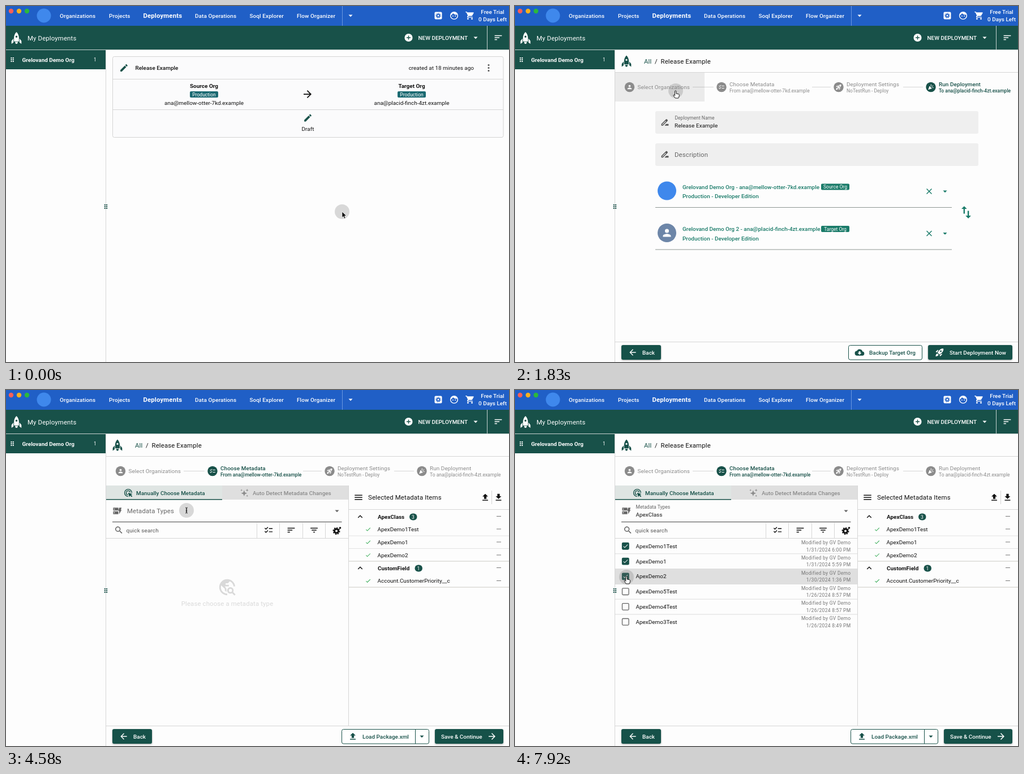
Animation, 889 px wide and 630 px high, one loop 8000 ms. Source, as an HTML page:

```html
<!DOCTYPE html>
<html lang="en">
<head>
<meta charset="utf-8">
<title>Deployments</title>
<style>
html, body { margin: 0; width: 100%; height: 100%; overflow: hidden; background: #fdfdfd; }
svg { display: block; width: 100vw; height: 100vh; font-family: Roboto, sans-serif; }
text { white-space: pre; }
</style>
</head>
<body>
<svg id="stage" viewBox="0 0 889 630" xmlns="http://www.w3.org/2000/svg"></svg>
<script>
const GREEN = '#185149', TEAL = '#1a7b69', BLUE = '#205fc6', LOGO = '#3f88ec', INK = '#111', GREY = '#8b8b8b', PAGE = '#fdfdfd';
const S = 8.53, M = 9.95, L = 11.38;
const ORG = 'Grelovand Demo Org', JOB = 'Release Example';
const FROM = 'ana@mellow-otter-7kd.example', TO = 'ana@placid-finch-4zt.example';

const ICON = {
  edit: 'M3 17.25V21h3.75L17.81 9.94l-3.75-3.75zM20.71 7.04c.39-.39.39-1.02 0-1.41l-2.34-2.34c-.39-.39-1.02-.39-1.41 0l-1.83 1.83 3.75 3.75z',
  rename: 'M18.41 5.8L17.2 4.59c-.78-.78-2.05-.78-2.83 0L3 15.96V20h4.04L18.41 8.63c.79-.78.79-2.05 0-2.83zM6.21 18H5v-1.21l8.66-8.66 1.21 1.21zM11 20l4-4h6v4z',
  next: 'M12 4l-1.41 1.41L16.17 11H4v2h12.17l-5.58 5.59L12 20l8-8z',
  back: 'M20 11H7.83l5.59-5.59L12 4l-8 8 8 8 1.41-1.41L7.83 13H20z',
  drop: 'M7 10l5 5 5-5z',
  add: 'M12 2a10 10 0 1 0 0 20 10 10 0 1 0 0-20zm5 11h-4v4h-2v-4H7v-2h4V7h2v4h4z',
  sort: 'M3 18h6v-2H3zM3 6v2h18V6zM3 13h12v-2H3z',
  filter: 'M10 18h4v-2h-4zM3 6v2h18V6zM6 13h12v-2H6z',
  menu: 'M3 18h18v-2H3zM3 13h18v-2H3zM3 6v2h18V6z',
  cart: 'M7 18a2 2 0 1 0 0 4 2 2 0 1 0 0-4zM17 18a2 2 0 1 0 0 4 2 2 0 1 0 0-4zM1 2v2h2l3.6 7.6-1.4 2.4c-.7 1.4.3 3 1.8 3h12v-2H7.4l1.1-2h7.4c.8 0 1.4-.4 1.8-1l3.6-6.5c.3-.7-.2-1.5-.9-1.5H5.2l-.9-2z',
  face: 'M12 2a10 10 0 1 0 0 20 10 10 0 1 0 0-20zm0 18a8 8 0 0 1-8-9c2.4-.9 4.2-2.7 5.2-5 2 2.8 5 4.2 10.5 4A8 8 0 0 1 12 20zM9 11.7a1.3 1.3 0 1 0 0 2.6 1.3 1.3 0 1 0 0-2.6zm6 0a1.3 1.3 0 1 0 0 2.6 1.3 1.3 0 1 0 0-2.6z',
  person: 'M12 12a4 4 0 1 0 0-8 4 4 0 1 0 0 8zm0 2c-2.67 0-8 1.34-8 4v2h16v-2c0-2.66-5.33-4-8-4z',
  list: 'M22 7h-9v2h9zM22 15h-9v2h9zM5.54 11L2 7.46l1.41-1.41 2.12 2.12 4.24-4.24 1.41 1.41zM5.54 19L2 15.46l1.41-1.41 2.12 2.12 4.24-4.24 1.41 1.41z',
  search: 'M15.5 14h-.8l-.3-.3a6.5 6.5 0 1 0-.7.7l.3.3v.8l5 5 1.5-1.5zm-6 0a4.5 4.5 0 1 1 0-9 4.5 4.5 0 1 1 0 9z',
  close: 'M19 6.41L17.59 5 12 10.59 6.41 5 5 6.41 10.59 12 5 17.59 6.41 19 12 13.41 17.59 19 19 17.59 13.41 12z',
  check: 'M9 16.17L4.83 12l-1.42 1.41L9 19 21 7l-1.41-1.41z',
  less: 'M12 8l-6 6 1.41 1.41L12 10.83l4.59 4.58L18 14z',
  upload: 'M5 20h14v-2H5zM5 10h4v6h6v-6h4l-7-7z',
  download: 'M19 9h-4V3H9v6H5l7 7zM5 18v2h14v-2z',
  cloud: 'M19.35 10.04A7.5 7.5 0 0 0 5.35 8.04 6 6 0 0 0 6 20h13a5 5 0 0 0 .35-9.96zM17 13l-5 5-5-5h3V9h4v4z',
  launch: 'M9.2 6.3c-2 2.3-3.4 5.6-3.6 5.9L2 10.7l4-4c.5-.5 1.2-.7 1.9-.6zM11.2 17s3.7-1.5 5.9-3.7c5.4-5.4 4.5-9.6 4.2-10.6-1-.3-5.2-1.2-10.6 4.2C8.5 9.1 7 12.8 7 12.8zm6.5-2.2c-2.3 2-5.6 3.4-5.9 3.6l1.5 3.6 4-4c.5-.5.7-1.2.6-1.9zM9 18c0 .8-.3 1.6-.9 2.1C6.9 21.3 2 22 2 22s.7-4.9 1.9-6.1A3 3 0 0 1 9 18zm4-9a2 2 0 1 1 4 0 2 2 0 1 1-4 0z',
  party: 'M2 22l14-5-9-9zM14 11l6-6 1.2 1.2-6 6zM10 8c3-2 3-3 1-6l1.4-1c3 4 2 6-1 8.3zM16 14c3-2 5-2 7 0l-1 1.3c-2-1.5-3-1.3-5 0z',
  rocket: 'M12 0C8.6 3 7 8 7 12v7h10v-7c0-4-1.6-9-5-12zm0 7.5a2 2 0 1 1 0 4 2 2 0 1 1 0-4zM6 13l-4 5v6l4-3zM18 13l4 5v6l-4-3zM9 20h6l-1.5 4h-3z',
  swap: 'M16 17V10h-2v7h-3l4 4 4-4zM9 3L5 7h3v7h2V7h3z',
  target: 'M12 2a10 10 0 1 0 0 20v-2a8 8 0 1 1 8-8h2A10 10 0 0 0 12 2zm0 4a6 6 0 0 0-1 11.9v-2.1A4 4 0 1 1 15.8 11h2.1A6 6 0 0 0 12 6zM11.5 11.5l3.3 11 2-3.7 3.6 3.6 2-2-3.6-3.6 3.7-2z',
  sparkle: 'M11 5l2.2 5.8L19 13l-5.8 2.2L11 21l-2.2-5.8L3 13l5.8-2.2zM19 1l1 3 3 1-3 1-1 3-1-3-3-1 3-1zM19 17l.7 2.3L22 20l-2.3.7L19 23l-.7-2.3L16 20l2.3-.7zM4 2l.7 2.3L7 5l-2.3.7L4 8l-.7-2.3L1 5l2.3-.7z',
  types: 'M2 4h13v7H2zm2 2.5v2h2v-2zM2 13h13v7H2zm2 2.5v2h2v-2zM17 4h6l-2 5h2l-6 11v-8h-2z',
  globe: 'M12 2a10 10 0 1 0 0 20v-2a8 8 0 0 1-7.6-10.3L9 14v2l2 2v-4l-2-3h5V9h-4V7h3l2-2.4A8 8 0 0 1 19.8 11h2.1A10 10 0 0 0 12 2zm4 10a4 4 0 1 0 2 7.4l3 3 1.4-1.4-3-3A4 4 0 0 0 16 12zm0 2a2 2 0 1 1 0 4 2 2 0 1 1 0-4z'
};

// y is the middle of the capitals
const text = (x, y, s, size = M, fill = INK, weight = 400, anchor = 'start', ls = size > 11 ? .14 : 0) =>
  `<text x="${x}" y="${y + size * .355}" font-size="${size}" fill="${fill}" font-weight="${weight}" text-anchor="${anchor}" letter-spacing="${ls}">${s}</text>`;
const icon = (name, x, y, size = 17, fill = INK, attr = '') =>
  `<path d="${ICON[name]}" transform="translate(${x - size / 2} ${y - size / 2}) scale(${size / 24})" fill="${fill}" fill-rule="evenodd" ${attr}/>`;
const rect = (x, y, w, h, fill, r = 0, attr = '') => `<rect x="${x}" y="${y}" width="${w}" height="${h}" fill="${fill}" rx="${r}" ${attr}/>`;
const disc = (x, y, r, fill, attr = '') => `<circle cx="${x}" cy="${y}" r="${r}" fill="${fill}" ${attr}/>`;
const line = (x1, y1, x2, y2, c = '#d6d6d6', w = 1) => `<path d="M${x1} ${y1}L${x2} ${y2}" stroke="${c}" stroke-width="${w}"/>`;
const group = (id, ...parts) => `<g id="${id}">${parts.join('')}</g>`;
const each = (list, fn) => list.map(fn).join('');
const dots = (x, y, c) => each([-3, 0, 3], d => rect(x - 2.5, y + d - 1, 2, 2, c) + rect(x + .8, y + d - 1, 2, 2, c));
const gear = (x, y, r, c, w) => disc(x, y, r, 'none', `stroke="${c}" stroke-width="${w}"`) +
  disc(x, y, r + w / 2 + .6, 'none', `stroke="${c}" stroke-width="1.8" pathLength="16" stroke-dasharray="1.1 .9"`);
const badge = (x, y, w, s, c = TEAL) => rect(x, y - 5.5, w, 11, c, 2) + text(x + w / 2, y, s, S, '#fff', 400, 'middle');
const button = (x, w, body) => rect(x, 600, w, 26, GREEN, 3, 'filter="url(#lift)"') + body;
const outline = (x, w, body) => rect(x + .5, 600.5, w, 25.5, '#fff', 3, `stroke="${GREEN}"`) + body;

const topBar = () => rect(0, 0, 889, 35, BLUE) +
  disc(9, 9, 4.2, '#fb5f57') + disc(23, 9, 4.2, '#f9b01f') + disc(37, 9, 4.2, '#2bb83c') + disc(67, 17, 12.5, LOGO) +
  each([[95, 'Organizations'], [182, 'Projects'], [334, 'Data Operations'], [430.5, 'Soql Explorer'], [514, 'Flow Organizer']],
    ([x, s]) => text(x, 17, s, M, '#fff', 500, 'start', .1)) +
  text(242.5, 17, 'Deployments', L, '#fff', 700) + line(594.5, 0, 594.5, 35, '#6b98df') + icon('drop', 609, 17, 17, '#fff') +
  rect(757.5, 10.5, 13, 13, '#fff', 2) + gear(764, 17, 2.3, BLUE, 1.6) +
  icon('face', 792, 17, 17, '#fff') + icon('cart', 820, 17, 17, '#fff') +
  text(860, 10, 'Free Trial', M, '#fff', 500, 'middle') + text(860, 23.5, '0 Days Left', M, '#fff', 500, 'middle') +
  rect(0, 35, 889, 42, GREEN) + icon('rocket', 18.5, 56.5, 21, '#fff') + text(38, 56.5, 'My Deployments', L, '#fff') +
  icon('add', 711.5, 56, 17, '#fff') + text(728.5, 56, 'NEW DEPLOYMENT', M, '#fff', 500) + icon('drop', 830, 56, 17, '#fff') +
  line(850.5, 35, 850.5, 77, '#c5d3d0') + icon('sort', 870, 56, 17, '#fff') + line(0, 77.5, 889, 77.5, '#c9d2d0');

const sidebar = () => rect(0, 78, 176, 34, GREEN) + dots(11, 95, '#fff') + text(28.5, 95, ORG, M, '#fff', 700) +
  text(155, 95, '1', S, '#fff') + line(176.5, 78, 176.5, 630) + dots(176.3, 355, GREEN);

const card = () => {
  const side = (x, title, mail) => text(x, 141.5, title, M, INK, 700, 'middle') +
    badge(x - 25, 156.5, 50, 'Production', '#1b6a72') + text(x, 171, mail, M, INK, 400, 'middle');
  return rect(188.5, 89.5, 690.5, 143, '#fbfbfc', 3, 'id="cardBox" stroke="#d4d4d4"') + line(189, 129.5, 879, 129.5) + line(189, 183.5, 879, 183.5) +
    icon('edit', 208.5, 109.5, 17, GREEN) + text(228.5, 109.5, JOB, M, INK, 500) +
    text(827, 109.5, 'created at 18 minutes ago', M, INK, 400, 'end') + each([-5, 0, 5], d => disc(853, 109.5 + d, 1.5, '#555')) +
    side(350, 'Source Org', FROM) + side(717, 'Target Org', TO) +
    icon('next', 533, 156, 21) + icon('edit', 533.5, 198, 17, GREEN) + text(533.5, 217.5, 'Draft', M, INK, 400, 'middle');
};

const STEPS = [
  [177, 335, 202.5, 'person', 'Select Organizations', ''],
  [335, 542, 365, 'list', 'Choose Metadata', 'From ' + FROM],
  [542, 705, 572, 'launch', 'Deployment Settings', 'NoTestRun - Deploy'],
  [705, 889, 735, 'party', 'Run Deployment', 'To ' + TO]
];
const stepper = () => icon('rocket', 197, 97.5, 20, GREEN) + text(228, 97.5, 'All', L, GREEN) + text(247, 97.5, '/', L) +
  text(257.5, 97.5, JOB, L) + line(177, 117.5, 889, 117.5) +
  line(314, 143.5, 351, 143.5) + line(525, 143.5, 558, 143.5) + line(686, 143.5, 721, 143.5) +
  each(STEPS, ([a, b, x, name, title, sub], i) => rect(a, 118, b - a, 51, '#000', 0, `id="tint${i}"`) +
    group('step' + i, disc(x, 143.5, 8.7, 'currentColor'), icon(name, x, 143.5, 11.5, '#fff'),
      text(x + 14, sub ? 138.5 : 143.5, title, M, 'currentColor', 'inherit', 'start', .07),
      sub && text(x + 14, 149.5, sub, S, 'currentColor', 'inherit')));

const orgRow = (y, avatar, name, tag) => avatar + text(296, y - 8, name, M, TEAL, 500) + badge(541, y - 8, 50, tag) +
  text(296, y + 8.5, 'Production - Developer Edition', M, TEAL, 500) + icon('close', 732, y, 17, TEAL) +
  icon('drop', 760, y, 17, TEAL) + line(248, y + 28.5, 772, y + 28.5, '#8d9692');

const orgPanel = () => group('orgPanel',
  rect(248, 186, 571, 40, '', 3, 'id="field0"'), rect(248, 243, 571, 40, '', 3, 'id="field1"'),
  icon('rename', 265, 206, 17, '#555'), icon('rename', 265, 262.5, 17, '#555'),
  text(282.5, 198, 'Deployment Name', S, '#666'), text(282, 211.5, JOB, M, INK, 400, 'start', .07), text(282, 262.5, 'Description', L, '#666'),
  orgRow(328, disc(268.5, 327, 16.5, LOGO), `${ORG} - ${FROM}`, 'Source Org'),
  group('org2', orgRow(402.5, disc(268.5, 401.5, 16.5, '#6d86a8') + icon('person', 268.5, 401.5, 21, '#fff'), `${ORG} 2 - ${TO}`, 'Target Org')),
  icon('swap', 797.5, 365, 29, TEAL));

const selection = () => {
  const head = (y, name, x, n) => icon('less', 626, y, 17) + text(657, y, name, M, INK, 700) + rect(x - 6.5, y - 5.5, 13.5, 12, GREEN, 6) +
    text(x, y + .5, n, S, '#fff', 400, 'middle');
  const items = ['ApexDemo1Test', 'ApexDemo1', 'ApexDemo2', '', 'Account.CustomerPriority__c'];
  return line(605.5, 169, 605.5, 594) + icon('menu', 623, 190, 18) + text(640, 190, 'Selected Metadata Items', L) +
    icon('upload', 847, 190, 17) + line(858.5, 178, 858.5, 202) + icon('download', 870.5, 190, 17) + line(606, 211.5, 889, 211.5) +
    head(224, 'ApexClass', 719.5, '3') + head(315, 'CustomField', 729, '1') +
    each(items, (s, i) => s && icon('check', 640, 246.5 + i * 22.8, 11, '#2fa84f') + text(656.5, 246.5 + i * 22.8, s)) +
    each([223.5, 246, 269, 292, 314.5, 337.5], y => line(867, y, 875, y, '#777')) +
    line(606, 258, 889, 258, '#e2e2e2') + line(606, 280.5, 889, 280.5, '#e2e2e2') + line(606, 303, 889, 303, '#cbcac4') + line(606, 349, 889, 349, '#cbcac4');
};

const ROW = 26.8;
const rows = () => each([['1Test', '31', '6:00'], ['1', '31', '5:59'], ['2', '30', '1:36'], ['5Test', '26', '8:57'], ['4Test', '26', '8:57'], ['3Test', '26', '8:49']],
  ([name, day, hour], i) => {
    const y = 276.3 + i * ROW;
    return rect(177, y - 13, 428, ROW, '#dfdfdf', 0, `id="row${i}"`) + (i < 5 ? line(177, y + 13.5, 605, y + 13.5, '#dcdcdc') : '') +
      rect(189.5, y - 5.8, 11.6, 11.6, i < 3 ? GREEN : 'none', 1.5, `stroke="${i < 3 ? GREEN : '#666'}" stroke-width="1.3"`) +
      (i < 3 ? icon('check', 195.3, y, 11, '#fff') : '') + text(213.5, y, 'ApexDemo' + name) +
      text(593.5, y - 6.2, 'Modified by GV Demo', S, '#777', 400, 'end', .28) + text(593.5, y + 6.2, `1/${day}/2024 ${hour} PM`, S, '#777', 400, 'end', .28);
  });

const MENU = ['ApexClass', 'ApexComponent', 'ApexPage', 'ApexTrigger', 'ApprovalProcess', 'AssignmentRules', 'AuraDefinitionBundle',
  'CustomApplication', 'CustomField', 'CustomLabel', 'CustomObject', 'CustomPermission'];
const dataPanel = () => group('dataPanel',
  rect(177, 169, 205, 25, '#dfe5e3'), rect(382, 169, 223, 25, '#dfdfdf'), rect(177, 193, 205, 1.5, GREEN),
  icon('target', 216, 182, 17, GREEN), text(230, 182, 'Manually Choose Metadata', M, GREEN, 500),
  icon('sparkle', 421.5, 182, 16, GREY), text(436, 182, 'Auto Detect Metadata Changes', M, GREY, 500),
  icon('types', 196.5, 214, 17, '#666'), group('label', text(214, 214, 'Metadata Types', L, '#666')),
  group('floatLabel', text(213.5, 206.5, 'Metadata Types', S, 'currentColor')), group('value', text(213.5, 220, 'ApexClass')),
  icon('drop', 585, 214, 17, '#666', 'id="dropDown"'), group('dropUp', '<path d="M581.5 216l3.5-3.5 3.5 3.5z" fill="#666"/>'),
  line(188, 233.5, 593.5, 233.5, '#444'), group('focusLine', line(188, 233.5, 593.5, 233.5, GREEN, 2)),
  icon('search', 199.5, 248, 17, '#555'), text(212.5, 248.5, 'quick search', M, '#555', 400, 'start', .1),
  each([443.5, 483.5, 524.5, 564.5], x => line(x, 235, x, 262)), line(177, 262.5, 605, 262.5),
  icon('list', 464, 248, 17), icon('sort', 504, 248, 17), icon('filter', 544.5, 248, 17),
  gear(584, 249.5, 3.5, INK, 3), disc(590.5, 244, 1.8, INK),
  group('empty', icon('globe', 391, 349, 34, '#d9d9d9'), text(391, 378, 'Please choose a metadata type', L, '#dadada', 400, 'middle')),
  group('rows', rows()), selection());

const menu = () => group('menu', rect(188, 234, 406, 400, PAGE, 0, 'filter="url(#lift)"'),
  rect(188, 234, 406, 34, '#d6d6d6', 0, 'id="menuHover"'), each(MENU, (s, i) => text(199.5, 251.5 + i * 34.05, s)));

const backButton = () => button(188, 70, icon('back', 208, 613, 17, '#fff') + text(225, 613, 'Back', M, '#fff', 500));
const footer = () => line(177, 594.5, 889, 594.5) + group('backBtn', backButton()) +
  group('runBtns', outline(589, 130, icon('cloud', 609, 613, 17, GREEN) + text(626, 613, 'Backup Target Org', M, GREEN, 500)),
    button(730, 149, icon('launch', 750.5, 613, 17, '#fff') + text(768, 613, 'Start Deployment Now', M, '#fff', 500))) +
  group('loadBtn', outline(593, 154, icon('upload', 613, 613, 17, GREEN) + text(630, 613, 'Load Package.xml', M, GREEN, 500) +
    line(723.5, 601, 723.5, 626, GREEN) + icon('drop', 735, 613, 17, GREEN))) +
  group('saveBtn', button(758, 121, text(769, 613, 'Save &amp; Continue', M, '#fff', 500) + icon('next', 859, 613, 18, '#fff')));

const pointer = () => disc(0, 0, 13, '#777', 'id="halo" opacity=".27"') + group('pointer',
  group('arrow', '<path d="M0 0v10.5l2.4-2.3 1.7 4 1.9-.8-1.7-3.9h3.4z" fill="#000" stroke="#fff" stroke-width=".7"/>'),
  group('hand', '<path d="M-1.2 0c0-1.6 2.4-1.6 2.4 0v4l4 .8c1 .2 1.5.8 1.4 1.8l-.6 3.4-1 2h-5.4l-3.2-4.2c-.8-1.2.6-2 1.6-1.2l.8.9z" fill="#fff" stroke="#000" stroke-width=".9"/>'),
  group('beam', '<path d="M-2-5q2 0 2 1.5v7q0 1.5-2 1.5M2-5q-2 0-2 1.5v7q0 1.5 2 1.5M-1.3 1h2.6" fill="none" stroke="#000" stroke-width=".8"/>'));

const stage = document.getElementById('stage');
stage.innerHTML = '<defs><filter id="lift" x="-10%" y="-20%" width="120%" height="150%"><feDropShadow dx="0" dy="1" stdDeviation="1.5" flood-opacity=".35"/></filter></defs>' +
  rect(0, 0, 889, 630, PAGE) + topBar() + sidebar() + group('home', card()) +
  group('wizard', stepper(), orgPanel(), dataPanel(), footer(), menu()) + pointer();

const $ = id => document.getElementById(id);
const show = (id, on) => $(id).setAttribute('display', on ? 'inline' : 'none');
const ramp = (t, a, b) => Math.min(1, Math.max(0, (t - a) / (b - a)));
const ease = p => p * p * (3 - 2 * p);

const PATH = [[250, 594, 364], [830, 476, 189], [1083, 476, 189], [1750, 284, 150], [2000, 283, 154], [2417, 283, 155], [2500, 287, 167],
  [2750, 268, 215], [3000, 243, 265], [3170, 252, 282], [3420, 335, 240], [3667, 415, 160], [3750, 420, 155], [3917, 420, 155],
  [4420, 319, 213], [5500, 319, 213], [5917, 280, 257], [6920, 280, 258], [7670, 199, 327], [7830, 197, 331]];
const KINDS = [[0, 'arrow'], [660, 'hand'], [990, 'beam'], [1240, 'arrow'], [1490, 'hand'], [2570, 'arrow'], [2740, 'beam'], [3570, 'hand'],
  [4070, 'arrow'], [4320, 'beam'], [5570, 'hand'], [6400, 'arrow'], [7070, 'hand']];
const latest = (list, t) => list.filter(k => k[0] <= t).pop();

function place(t) {
  const i = PATH.findIndex(k => k[0] > t);
  if (i < 1) return (i ? PATH[PATH.length - 1] : PATH[0]).slice(1);
  const [a, b] = [PATH[i - 1], PATH[i]], p = ease(ramp(t, a[0], b[0]));
  return [1, 2].map(k => a[k] + (b[k] - a[k]) * p);
}

function render(ms) {
  const t = Math.floor(ms * .012 + .1) / .012 + .5;
  const [x, y] = place(t), halo = place(t - 83), home = t < 1000;
  const step = t < 2160 ? 3 : t < 3910 ? 0 : 1, data = t > 4080, picked = t > 6240;

  show('home', home);
  show('wizard', !home);
  if (y < 232) $('cardBox').setAttribute('filter', 'url(#lift)');
  else $('cardBox').removeAttribute('filter');

  STEPS.forEach(([a, b], i) => {
    const over = y > 118 && y < 169 && x >= a && x < b, on = i === step;
    const press = i === 0 ? 1 - ramp(t, 2583, 2850) : 1 - ramp(t, 4083, 4400);
    $('step' + i).setAttribute('style', `color:${on ? GREEN : GREY};font-weight:${on ? 500 : 400}`);
    $('tint' + i).setAttribute('fill', on ? GREEN : '#000');
    $('tint' + i).setAttribute('opacity', on && i < 2 ? .31 * press : over ? .07 : 0);
  });
  [186, 243].forEach((top, i) => {
    const over = step === 0 && y > top && y < top + 40 && x > 248;
    $('field' + i).setAttribute('fill', over ? '#e8e8e8' : '#efefef');
  });

  show('orgPanel', !data);
  show('org2', t > 1080);
  show('dataPanel', data);
  show('backBtn', step !== 0);
  show('runBtns', step === 3);
  show('loadBtn', step === 1);
  show('saveBtn', step < 2);

  const fade = ramp(t, 5250, 5500) * (1 - ramp(t, 6167, 6417)), open = t > 5330 && !picked, focus = t > 5330 && t < 7740;
  show('menu', fade > 0);
  $('menu').setAttribute('opacity', fade);
  show('menuHover', y > 234);
  show('label', t < 5330);
  show('floatLabel', t > 5330);
  $('floatLabel').setAttribute('color', focus ? GREEN : '#666');
  show('focusLine', focus);
  show('value', picked);
  show('dropDown', !open);
  show('dropUp', open);
  show('empty', !picked);
  show('rows', t > 6490);
  for (let i = 0; i < 6; i++) show('row' + i, Math.floor((y - 263) / ROW) === i);

  const kind = latest(KINDS, t)[1];
  ['arrow', 'hand', 'beam'].forEach(k => show(k, k === kind));
  $('pointer').setAttribute('transform', `translate(${x} ${y})`);
  $('halo').setAttribute('transform', `translate(${halo[0]} ${halo[1]})`);
}

function tick(now) {
  render(now % 8000);
  requestAnimationFrame(tick);
}
render(0);
requestAnimationFrame(tick);
</script>
</body>
</html>
```
